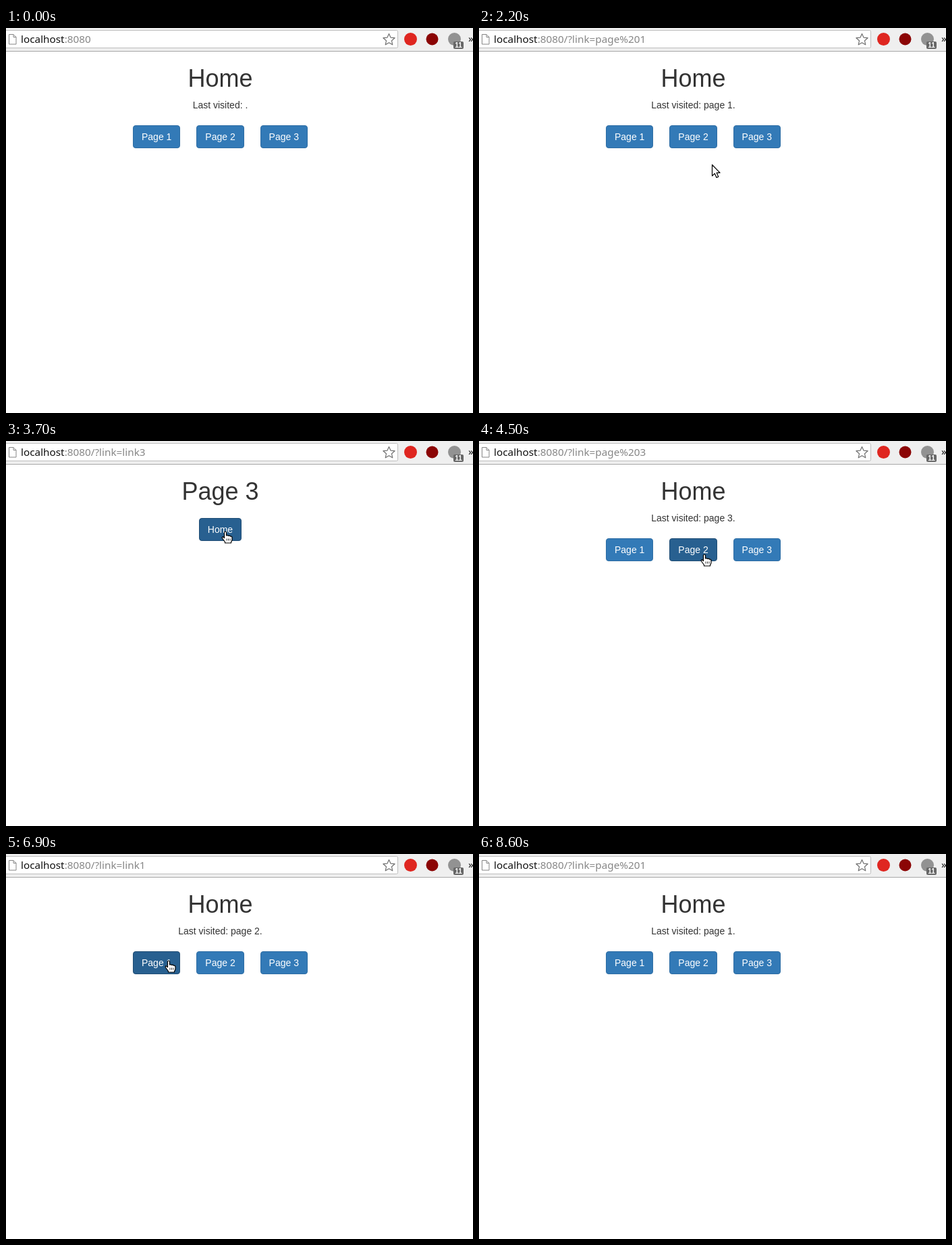
These frames come from a looping animation (692x570 px, 9300 ms). An HTML page:

```html
<!DOCTYPE html>
<html lang="en">
<head>
<meta charset="utf-8">
<title>Last visited page</title>
<style>
html, body { margin: 0; width: 100%; height: 100%; overflow: hidden; background: #fff; }
svg { display: block; }
text { font-family: "Liberation Sans", Arial, sans-serif; font-size: 14px; fill: #333; white-space: pre; }
.mid { text-anchor: middle; }
.title { font-size: 36px; }
.bar { font-family: "Noto Sans", sans-serif; font-size: 15.3px; fill: #111; }
.dim { fill: #868686; }
.btn rect { fill: #337ab7; stroke: #2e6da4; }
.btn.on rect { fill: #286090; stroke: #204d74; }
.btn text { fill: #fff; }
.badge { font-size: 10px; font-weight: bold; fill: #fff; }
</style>
</head>
<body>
<svg width="692" height="570" viewBox="0 0 692 570">
  <rect width="692" height="34" fill="#efefef"/>
  <rect y="34" width="692" height="1" fill="#a9a9a9"/>
  <rect x="-5.5" y="3.5" width="586" height="26" rx="2" fill="#fff" stroke="#bdbdbd"/>
  <path d="M4.5 9.5h6.500l4 4v10.500h-10.500zM11 9.500v4h4" fill="#fff" stroke="#858585"/>
  <text class="bar" x="22" y="22">localhost<tspan class="dim">:8080<tspan id="path"></tspan></tspan></text>
  <path id="star" fill="#fff" stroke="#707070" stroke-width="1.2" stroke-linejoin="round"/>
  <circle cx="599.5" cy="16.5" r="9.5" fill="#df2620"/>
  <circle cx="631.5" cy="16.5" r="9" fill="#8b0505"/>
  <circle cx="664.5" cy="16.5" r="9.5" fill="#929292"/>
  <rect x="663" y="20" width="15" height="11" rx="2" fill="#666"/>
  <text class="badge mid" x="670.5" y="29">11</text>
  <text class="bar" x="685" y="21">»</text>
  <text class="title mid" id="title" x="317.5" y="87"></text>
  <text class="mid" id="last" x="317.5" y="119"></text>
  <g id="buttons"></g>
  <g id="cursor" stroke="#000" stroke-width="1.2" stroke-linejoin="round">
    <path id="arrow" d="M.5 .5v16.500l3.800-3.600 2.700 6 2.800-1.200-2.700-5.900h5z" fill="#fff"/>
    <g id="hand">
      <path d="M-1.500 1.500q0-1.500 1.500-1.500t1.500 1.500v4.500q2-1 3 .5 2-.8 3 .7 2.500-.5 2.500 1.800v3.500l-1.500 3.500v1h-9v-1.500l-4-5.500q-.8-2 1-2.200l2 1.700z" fill="#fff"/>
      <path d="M2 10.500v3M4.500 10.500v3M7 10.500v3" stroke-width=".8"/>
    </g>
    <path id="beam" d="M-3.500-7.500h2.500l1 1 1-1h2.500M0-6.500v14M-3.500 8.500h2.500l1-1 1 1h2.500" fill="none" stroke-width="1"/>
  </g>
</svg>
<script>
const $ = id => document.getElementById(id);
const LOOP = 9300, STEP = 100, ENTER = 200, LEAVE = 8600;
const LOAD = 100; // the page follows its address after this delay

const visits = [
  { page: 1, open: 900, back: 1800 },
  { page: 3, open: 2800, back: 3800 },
  { page: 2, open: 4600, back: 5600 },
  { page: 1, open: 6900, back: 7700 }
];

// Pointer moves: start, end, x, y; it rests in between
const origin = [89, 260];
const moves = [
  [200, 700, 238, 164],
  [1000, 1200, 298, 169],
  [1400, 1600, 308, 136],
  [1900, 2200, 345, 202],
  [2200, 2700, 418, 166],
  [3000, 3600, 325, 134],
  [3800, 3900, 330, 220],
  [4400, 4500, 334, 168],
  [4700, 5300, 332, 116],
  [5500, 5700, 322, 187],
  [6200, 6800, 241, 158],
  [7000, 7500, 318, 132],
  [7800, 8200, 345, 12],
  [8300, 8500, 354, -4]
];

function sceneAt(t) {
  const s = { page: 0, path: '', last: '', pressed: false };
  for (const { page, open, back } of visits) {
    if (t >= open) s.path = '/?link=link' + page;
    if (t >= open + LOAD) s.page = page;
    if (t >= back) s.path = '/?link=page%20' + page;
    if (t >= back + LOAD) Object.assign(s, { page: 0, last: 'page ' + page });
    s.pressed = s.pressed || (t >= back && t < back + LOAD);
  }
  return s;
}

function pointerAt(t) {
  let [x, y] = origin;
  for (const [from, to, tx, ty] of moves) {
    if (t <= from) break;
    const u = Math.min(1, (t - from) / (to - from)), e = u * u * (3 - 2 * u);
    x += (tx - x) * e;
    y += (ty - y) * e;
  }
  return [Math.round(x), Math.round(y)];
}

function button(label, mid, y, width, onHome) {
  const x = Math.round(mid - width / 2), right = Math.round(mid + width / 2);
  const el = document.createElementNS('http://www.w3.org/2000/svg', 'g');
  el.innerHTML = `<rect x="${x + .5}" y="${y + .5}" width="${right - x - 1}" height="33" rx="3.5"/>` +
    `<text class="mid" x="${mid}" y="${y + 22}">${label}</text>`;
  $('buttons').append(el);
  const hit = (px, py) => px >= x && px < right && py >= y && py < y + 34;
  return { el, hit, onHome };
}

const buttons = [1, 2, 3].map(n => button('Page ' + n, 317.5 + (n - 2) * 94.3, 144, 70.4, true));
buttons.push(button('Home', 317.5, 114, 63.3, false));

const star = Array.from({ length: 10 }, (_, i) => {
  const r = i % 2 ? 4.2 : 9, a = i * Math.PI / 5;
  return `${567.5 + r * Math.sin(a)} ${17.5 - r * Math.cos(a)}`;
});
$('star').setAttribute('d', `M${star.join('L')}Z`);

const show = (el, on) => el.style.display = on ? '' : 'none';

function draw(t) {
  const { page, path, last, pressed } = sceneAt(t);
  const [x, y] = pointerAt(t);
  const visible = t >= ENTER && t < LEAVE;
  let over = false;

  $('path').textContent = path;
  $('title').textContent = page ? 'Page ' + page : 'Home';
  $('last').textContent = page ? '' : `Last visited: ${last}.`;
  for (const b of buttons) {
    const shown = b.onHome === !page;
    const hit = shown && visible && b.hit(x, y);
    show(b.el, shown);
    b.el.setAttribute('class', hit || pressed ? 'btn on' : 'btn');
    over = over || hit;
  }

  const inField = y > 3 && y < 30;
  show($('cursor'), visible);
  $('cursor').setAttribute('transform', `translate(${x} ${y})`);
  show($('hand'), over);
  show($('beam'), inField);
  show($('arrow'), !over && !inField);
}

const start = performance.now();
function tick() {
  const t = (performance.now() - start) % LOOP;
  draw(Math.floor(t / STEP) * STEP);
  requestAnimationFrame(tick);
}
tick();
</script>
</body>
</html>
```
